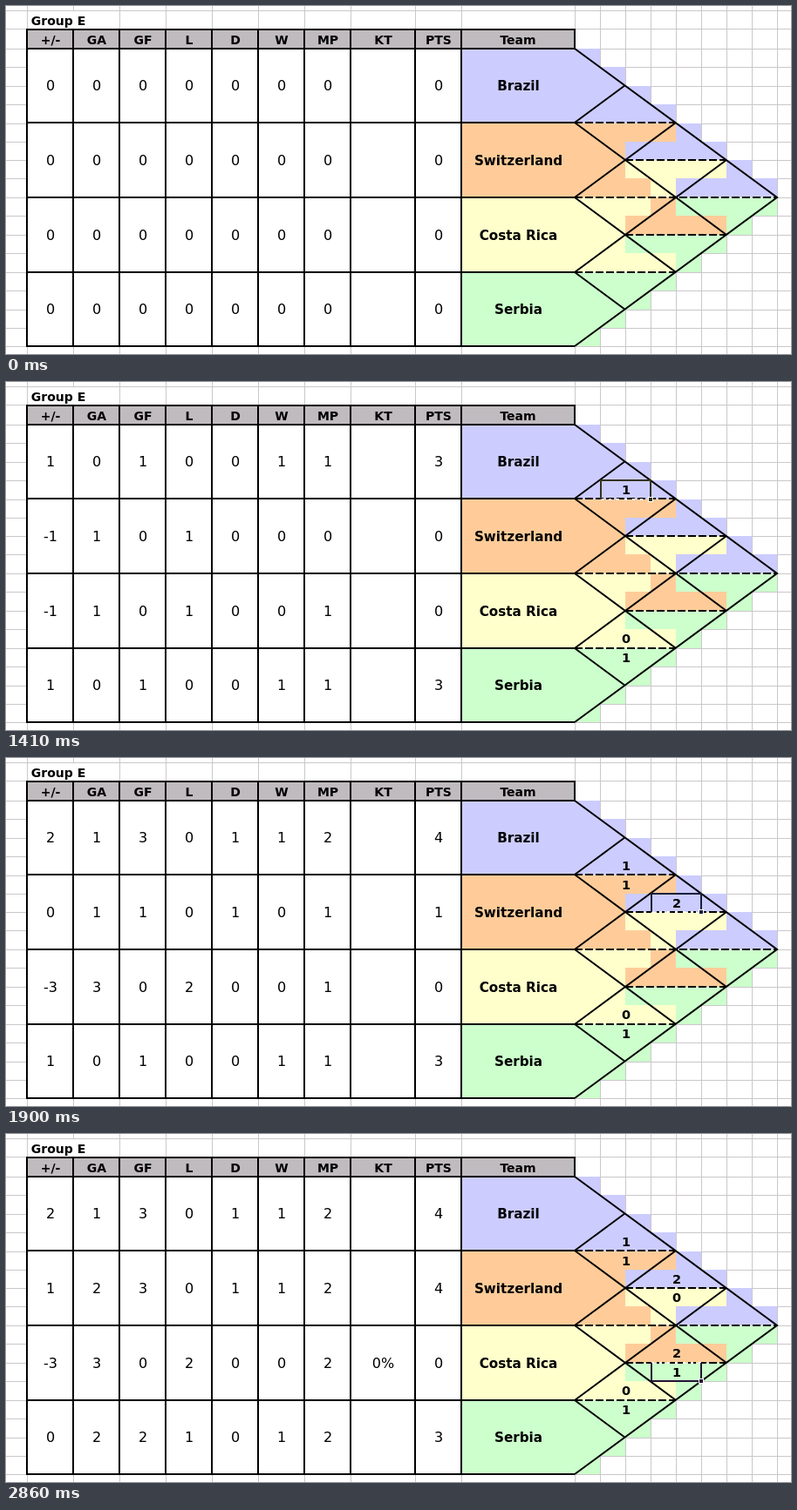
Animation of 900x400 px, one loop 3.64 s. Source, as an HTML page:

```html
<!DOCTYPE html>
<html lang="en">
<head>
<meta charset="utf-8">
<title>Group E</title>
<style>
  html, body { margin: 0; width: 100%; height: 100%; overflow: hidden; background: #fff; }
  svg { display: block; width: 900px; height: 400px; }
  text { font-family: "DejaVu Sans", Verdana, sans-serif; text-anchor: middle; }
  .head { font-size: 14px; font-weight: bold; }
  .team { font-size: 15.2px; font-weight: bold; }
  .stat { font-size: 16px; }
  .score { font-size: 14.5px; font-weight: bold; }
  .grid { stroke: #cbc7cb; shape-rendering: crispEdges; }
  .line { stroke: #000; stroke-width: 2; fill: none; }
  .crisp { shape-rendering: crispEdges; }
</style>
</head>
<body>
<svg id="stage" viewBox="0 0 900 400"></svg>
<script>
const LOOP = 3640;
const stage = document.getElementById('stage');

function add(tag, attrs, text, parent = stage) {
  const el = document.createElementNS('http://www.w3.org/2000/svg', tag);
  for (const key in attrs) el.setAttribute(key, attrs[key]);
  if (text !== undefined) el.textContent = text;
  parent.appendChild(el);
  return el;
}
const path = (d, cls, extra = {}) => add('path', { d, class: cls, ...extra });
const label = (x, y, cls, text) => add('text', { x, y, class: cls }, text);
const box = (x, y, x2, y2, fill) =>
  add('rect', { x, y, width: x2 - x, height: y2 - y, fill, class: 'crisp' });

// Sheet geometry
const cols = [24, 77, 130, 183, 236, 289, 342, 395, 469, 522, 652];
const stepX = i => 652 + 29 * i;
const rowY = i => Math.round(49 + 21.4 * i - 0.3 * (i % 2));
const bandY = [49, 134, 220, 306, 391];
const baseY = [97, 183, 269, 354];
const statX = [51, 104, 157, 210, 263, 316, 369, 432.5, 496];
const colors = { B: '#ccccff', S: '#ffcc99', C: '#ffffcc', E: '#ccffcc' };
const teams = { B: 'Brazil', S: 'Switzerland', C: 'Costa Rica', E: 'Serbia' };
const heads = ['+/-', 'GA', 'GF', 'L', 'D', 'W', 'MP', 'KT', 'PTS', 'Team'];

// One letter per cell of the stepped area right of the table
const steps = [
  'B', 'BB', 'BBB', 'BBBB', 'SSSSB', 'SSBBBB', 'SSCCCCB', 'SSSCBBBB',
  'CCCSEEEE', 'CCSSSSE', 'CCEEEE', 'CCCCE', 'EEEE', 'EEE', 'EE', 'E'
];

function drawSheet() {
  let d = '';
  for (const x of cols) d += `M${x + 0.5} 0V400`;
  for (let i = 1; i <= 8; i++) d += `M${stepX(i) + 0.5} 0V400`;
  for (const y of [5, 26]) d += `M0 ${y + 0.5}H900`;
  for (let i = 0; i <= 16; i++) d += `M0 ${rowY(i) + 0.5}H900`;
  path(d, 'grid');

  box(25, 6, 130, 26, '#fff');
  box(24, 49, 522, 391, '#fff');
  box(24, 27, 652, 49, '#bfbbbf');
  Object.keys(teams).forEach((key, i) => box(522, bandY[i], 653, bandY[i + 1], colors[key]));
  steps.forEach((row, r) => [...row].forEach((key, c) =>
    box(stepX(c), rowY(r), stepX(c + 1), rowY(r + 1), colors[key])));

  d = 'M23 27H653M652 27V49';
  for (const y of bandY) d += `M23 ${y}H652`;
  for (const x of cols.slice(0, -1)) d += `M${x} 27V391`;
  path(d, 'line crisp');
  path('M652 134H768M652 220H884M652 306H768M710 177H826M710 263H826',
    'line crisp', { 'stroke-dasharray': '9 3' });
  path('M652 49L884 220L652 391M652 134L826 263M652 220L768 306M652 306L710 349' +
    'M652 306L826 177M652 220L768 134M652 134L710 91', 'line');

  label(60, 22, 'head', 'Group E');
  heads.forEach((name, i) => label(i < 9 ? statX[i] : 587, 44, 'head', name));
  Object.values(teams).forEach((name, i) => label(587.5, baseY[i], 'team', name));
}

// Each entry: start, step column, step row, score, ink, changed table rows
const entries = [
  [740, 1, 11, 0, '#10102c', { C: '0 0 0 0 1 0 1 _ 1' }],
  [1060, 1, 12, 1, '#14203c', { C: '-1 1 0 1 0 0 1 _ 0', E: '1 0 1 0 0 1 1 _ 3' }],
  [1410, 1, 3, 1, '#34341c', { B: '1 0 1 0 0 1 1 _ 3', S: '-1 1 0 1 0 0 0 _ 0' }],
  [1620, 1, 4, 1, '#1c345c', { B: '0 1 1 0 1 0 1 _ 1', S: '0 1 1 0 1 0 1 _ 1' }],
  [1900, 3, 5, 2, '#14203c', { B: '2 1 3 0 1 1 2 _ 4', C: '-3 3 0 2 0 0 1 _ 0' }],
  [2240, 3, 6, 0, '#10102c', { C: '-3 3 0 2 0 0 2 _ 0' }],
  [2560, 3, 9, 2, '#14203c', { S: '2 1 3 0 1 1 2 _ 4', C: '-3 3 0 2 0 0 2 0% 0', E: '-1 2 1 1 0 1 1 _ 3' }],
  [2860, 3, 10, 1, '#241434', { S: '1 2 3 0 1 1 2 _ 4', E: '0 2 2 1 0 1 2 _ 3' }]
];

// The cursor's edge on the dashed divider stays broken
function makeCursor(col, row, ink) {
  const g = add('g', { class: 'crisp' });
  const x = stepX(col) + 1, x2 = stepX(col + 2);
  const y = rowY(row), y2 = rowY(row + 1);
  const above = [3, 5, 9, 11].includes(row);
  const [open, shut] = above ? [y2, y] : [y, y2];
  add('path', { d: `M${x} ${open}H${x2}`, stroke: '#fff', 'stroke-width': 2, 'stroke-dasharray': '3 6' }, undefined, g);
  add('path', { d: `M${x} ${open}V${shut}H${x2}V${open}`, fill: 'none', stroke: ink, 'stroke-width': 2.5 }, undefined, g);
  add('rect', { x: x2 - 3, y: y2 - 3, width: 6, height: 6, fill: '#fff' }, undefined, g);
  add('rect', { x: x2 - 2, y: y2 - 2, width: 4, height: 4, fill: ink }, undefined, g);
  return g;
}

drawSheet();
const stats = {};
Object.keys(teams).forEach((key, i) => {
  stats[key] = statX.map(x => label(x, baseY[i], 'stat', ''));
});
const marks = entries.map(([start, col, row, score, ink]) => ({
  start,
  cursor: makeCursor(col, row, ink),
  score: label(stepX(col + 1) + 1, rowY(row) + 16, 'score', score)
}));

let shown = -2;
function render(time) {
  let now = -1;
  entries.forEach((entry, i) => { if (time >= entry[0]) now = i; });
  if (now === shown) return;
  shown = now;

  const rows = {};
  for (const key in teams) rows[key] = '0 0 0 0 0 0 0 _ 0';
  entries.slice(0, now + 1).forEach(entry => Object.assign(rows, entry[5]));
  for (const key in rows) {
    rows[key].split(' ').forEach((value, i) => {
      stats[key][i].textContent = value === '_' ? '' : value;
    });
  }
  marks.forEach((mark, i) => {
    mark.score.style.display = i <= now ? '' : 'none';
    mark.cursor.style.display = i === now ? '' : 'none';
  });
}

const began = performance.now();
function tick() {
  render((performance.now() - began) % LOOP);
  requestAnimationFrame(tick);
}
tick();
</script>
</body>
</html>
```
